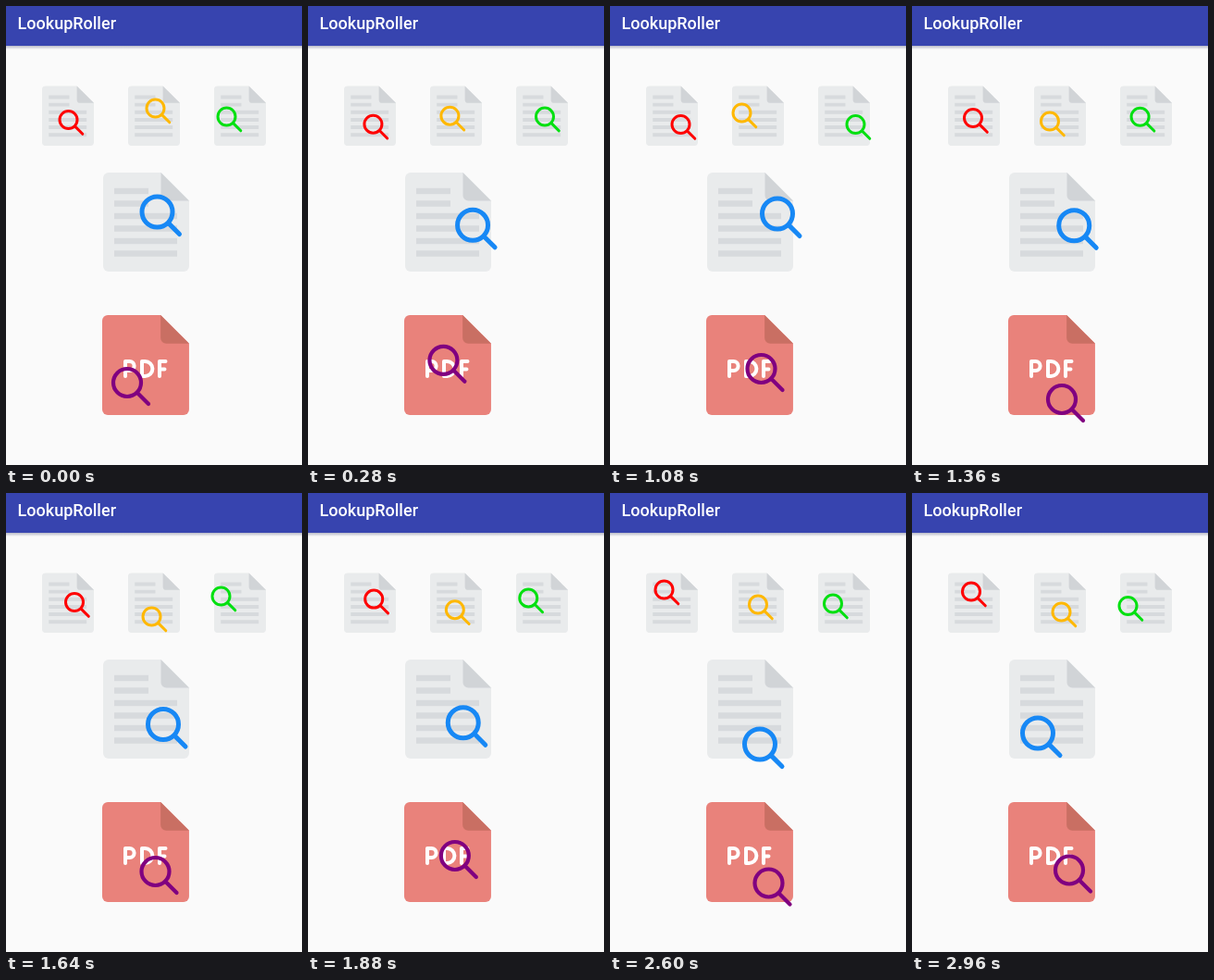
Write an HTML page that moves like this. It is 320x496 px and loops after 3 s.

```html
<!DOCTYPE html>
<html lang="en">
<head>
<meta charset="utf-8">
<title>LookupRoller</title>
<style>
html, body { margin: 0; width: 100%; height: 100%; overflow: hidden; background: #fafafa; }
svg { display: block; width: 100vw; height: 100vh; }
.title { font: 500 18px Roboto, Arial, sans-serif; fill: #fff; }
.lens { fill: none; stroke-linecap: round; }
</style>
</head>
<body>
<svg viewBox="0 0 320 496">
  <defs>
    <linearGradient id="shade" x2="0" y2="1">
      <stop stop-color="#b9bbc8"/>
      <stop offset="1" stop-color="#fafafa"/>
    </linearGradient>
    <path id="sheet" d="M6 0H62.5L93 30.5V101a6 6 0 0 1-6 6H6a6 6 0 0 1-6-6V6a6 6 0 0 1 6-6Z"/>
    <path id="fold" d="M62.5 0L93 30.5H68.5a6 6 0 0 1-6-6Z"/>
    <g id="doc">
      <use href="#sheet" fill="#e9ebec"/>
      <use href="#fold" fill="#d1d4d7"/>
      <path d="M12 20h37M12 33.5h37M12 47h68M12 60.5h68M12 74h68M12 87.5h68" stroke="#d7dadd" stroke-width="6.5"/>
    </g>
  </defs>
  <rect width="320" height="496" fill="#fafafa"/>
  <rect y="43" width="320" height="4" fill="url(#shade)"/>
  <rect width="320" height="43" fill="#3744af"/>
  <text class="title" x="12.5" y="25">LookupRoller</text>
  <use href="#doc" transform="translate(39 86.5) scale(.602)"/>
  <use href="#doc" transform="translate(132 86.5) scale(.602)"/>
  <use href="#doc" transform="translate(225 86.5) scale(.602)"/>
  <use href="#doc" transform="translate(105 180)"/>
  <g transform="translate(104 334) scale(1.01)">
    <use href="#sheet" fill="#e9827b"/>
    <use href="#fold" fill="#c96f63"/>
  </g>
  <path d="M129 400V384h4.6a5 5 0 0 1 0 10H129M147 384v16h3.4a8 8 0 0 0 0-16ZM166 400V384h6.5M166 392.5h5.5"
        fill="none" stroke="#fff" stroke-width="4" stroke-linecap="round" stroke-linejoin="round"/>
  <g id="lenses"></g>
</svg>
<script>
const LOOP = 3000, STEP = 40;
const stops = [0, 600, 1080, 1640, 2160, 2600, 2960];

// Each path lists positions at the shared stops; extra holds [time, x, y] waypoints.
const lenses = [
  { color: '#f00', radius: 9.5, width: 3, tip: 15.3,
    path: [[67.5, 123], [73.5, 131], [76.5, 128], [74, 118], [65.5, 110.5], [58.5, 104.5], [64, 106.5]],
    extra: [[1360, 66, 121]] },
  { color: '#ffb800', radius: 9.5, width: 3, tip: 15.3,
    path: [[161.5, 110.5], [145.5, 124.5], [142.5, 115.5], [157.5, 133.5], [158.5, 117], [160, 120.5], [161.5, 128.5]] },
  { color: '#00e010', radius: 9.5, width: 3, tip: 15.3,
    path: [[238.5, 119.5], [268.5, 120.5], [265.5, 128], [232.5, 111.5], [245.5, 117], [241, 119.5], [233.5, 122]],
    extra: [[2800, 235, 121]] },
  { color: '#1788f5', radius: 16.5, width: 5, tip: 24,
    path: [[163.5, 222.5], [188.5, 247], [181, 224.5], [170, 250], [166, 246], [162, 271.5], [136, 259.5]] },
  { color: '#800080', radius: 15, width: 4.2, tip: 23,
    path: [[131, 407], [162, 365.5], [163.5, 392], [161.5, 409], [156.5, 379.5], [171.5, 421.5], [170, 407.5]],
    extra: [[840, 163, 417], [1360, 162, 425], [2800, 173, 425]] }
];

function addShape(parent, name, attrs) {
  const el = document.createElementNS('http://www.w3.org/2000/svg', name);
  for (const key in attrs) el.setAttribute(key, attrs[key]);
  return parent.appendChild(el);
}

for (const lens of lenses) {
  lens.keys = lens.path.map(([x, y], i) => [stops[i], x, y])
    .concat(lens.extra || [])
    .sort((a, b) => a[0] - b[0]);
  lens.el = addShape(document.getElementById('lenses'), 'g',
    { class: 'lens', stroke: lens.color, 'stroke-width': lens.width });
  addShape(lens.el, 'circle', { r: lens.radius });
  const edge = lens.radius * 0.75;
  addShape(lens.el, 'path', { d: `M${edge} ${edge}L${lens.tip} ${lens.tip}` });
}

// Smooth Hermite curve through the keys, one axis at a time.
function sample(keys, axis, time) {
  let i = 0;
  while (i < keys.length - 2 && time >= keys[i + 1][0]) i++;
  const a = keys[i], b = keys[i + 1];
  const span = b[0] - a[0], u = Math.min(1, (time - a[0]) / span);
  const slope = k => {
    const p = keys[Math.max(0, k - 1)], n = keys[Math.min(keys.length - 1, k + 1)];
    const before = keys[k][axis] - p[axis], after = n[axis] - keys[k][axis];
    return before * after < 0 ? 0 : (n[axis] - p[axis]) / (n[0] - p[0]);
  };
  const v = 1 - u;
  return a[axis] * (1 + 2 * u) * v * v + b[axis] * u * u * (3 - 2 * u)
    + span * u * v * (slope(i) * v - slope(i + 1) * u);
}

function render(time) {
  for (const { el, keys } of lenses) {
    el.setAttribute('transform', `translate(${sample(keys, 1, time)} ${sample(keys, 2, time)})`);
  }
}

const start = performance.now();
function tick() {
  const time = (performance.now() - start) % LOOP;
  render(Math.floor(time / STEP) * STEP);
  requestAnimationFrame(tick);
}
tick();
</script>
</body>
</html>
```
